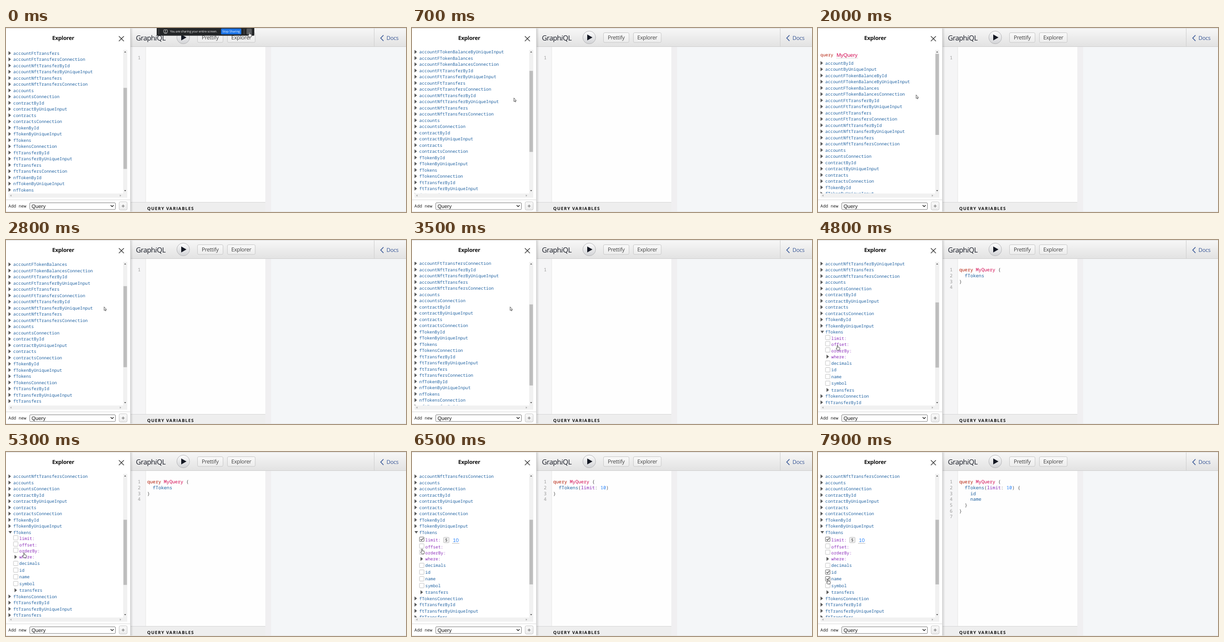
Animation of 799x370 px, one loop 8 s. Source, as an HTML page:

```html
<!DOCTYPE html>
<html lang="en">
<head>
<meta charset="utf-8">
<title>GraphiQL Explorer</title>
<style>
html, body { margin: 0; width: 100%; height: 100%; overflow: hidden; background: #fff; }
svg { display: block; width: 100%; height: 100%; }
text { white-space: pre; text-rendering: geometricPrecision; }
.ui { font-family: "Open Sans", "Noto Sans", sans-serif; }
.form { font: 10.35px "Liberation Sans", Arial, sans-serif; }
.mono { font-family: "Noto Sans Mono", "DejaVu Sans Mono", monospace; font-size: 8.55px; }
.code { font-size: 9.25px; }
.k { fill: #b11a04; }
.d { fill: #d2054e; }
.f { fill: #1f61a0; }
.a { fill: #8b2bb9; }
.n { fill: #2882f9; }
.p { fill: #555; }
.no { fill: #999; text-anchor: middle; }
.tri { fill: #5a5a5a; }
.box { fill: #fff; stroke: #c4c4c4; }
.tick { fill: none; stroke: #555; stroke-width: 1.4; visibility: hidden; }
.on .box { stroke: #666; }
.on .tick { visibility: visible; }
</style>
</head>
<body>
<svg viewBox="0 0 799 370" preserveAspectRatio="none">
  <defs>
    <linearGradient id="bar" x2="0" y2="1"><stop stop-color="#f7f7f7"/><stop offset="1" stop-color="#e2e2e2"/></linearGradient>
    <linearGradient id="btn" x2="0" y2="1"><stop stop-color="#f9f9f9"/><stop offset="1" stop-color="#ececec"/></linearGradient>
    <linearGradient id="run" x2="0" y2="1"><stop stop-color="#fdfdfd"/><stop offset="1" stop-color="#d2d3d6"/></linearGradient>
    <linearGradient id="shade"><stop stop-color="#000" stop-opacity=".13"/><stop offset="1" stop-color="#000" stop-opacity="0"/></linearGradient>
    <clipPath id="view"><rect x="0" y="44" width="234" height="288.5"/></clipPath>
    <clipPath id="field"><rect x="36" y="40" width="43" height="30"/></clipPath>
  </defs>
  <rect width="799" height="370" fill="#fefefe"/>

  <!-- editor and result panes -->
  <rect x="249" y="38" width="30" height="313" fill="#f5f5f6"/>
  <rect x="278.5" y="38" width="1" height="313" fill="#e6e6e6"/>
  <rect x="518" y="38" width="12" height="332" fill="#f0eff1"/>
  <rect x="529.5" y="38" width="269.5" height="332" fill="#f4f6f8"/>
  <rect x="249" y="350" width="269" height="20" fill="#eee"/>
  <rect x="249" y="350" width="269" height="1" fill="#d8d8d8"/>
  <text class="ui" x="282" y="366" font-size="8.6" font-weight="700" letter-spacing="1.1" fill="#111">QUERY VARIABLES</text>
  <g id="editor" class="mono code"></g>

  <!-- toolbar -->
  <rect x="249" width="550" height="38" fill="url(#bar)"/>
  <rect x="249" y="37" width="550" height="1" fill="#d0d0d0"/>
  <g class="ui" fill="#141823">
    <text x="259.5" y="25" font-size="14" letter-spacing="-.5">Graph<tspan font-family="'Liberation Serif', serif" font-style="italic" font-size="15">i</tspan>QL</text>
    <circle cx="354" cy="19" r="12.8" fill="url(#run)" stroke="#b4b4b6" stroke-width=".9"/>
    <path d="M350 13 360.5 19 350 25Z"/>
    <g fill="url(#btn)" stroke="#c6c6c6" stroke-width=".9">
      <rect x="382.5" y="9.5" width="51" height="19.5" rx="2.5"/>
      <rect x="442.3" y="9.5" width="55.5" height="19.5" rx="2.5"/>
    </g>
    <g font-size="10.9" letter-spacing="-.35" fill="#444">
      <text x="391" y="23">Prettify</text>
      <text x="450" y="23">Explorer</text>
    </g>
    <rect x="735" width="1" height="37" fill="#cfcfcf"/>
    <path d="M754 14.5 748.5 20.3 754 26" fill="none" stroke="#3b5998" stroke-width="1.5"/>
    <text x="760" y="24" font-size="11" letter-spacing="-.3" fill="#3b5998">Docs</text>
  </g>

  <!-- explorer panel -->
  <rect x="249" width="5" height="370" fill="url(#shade)"/>
  <rect width="248.5" height="370" fill="#fff"/>
  <rect x="248" width="1" height="370" fill="#d4d4d4"/>
  <text class="ui" x="92.3" y="24" font-size="11" font-weight="700" letter-spacing="-.25" fill="#111">Explorer</text>
  <path d="M225.5 16.5 235.5 26.5M235.5 16.5 225.5 26.5" stroke="#333" stroke-width="1.2"/>

  <g clip-path="url(#view)"><g id="list" class="mono">
    <text class="k" x="4.8" y="57">query</text>
    <text class="form d" x="37" y="57.5" clip-path="url(#field)">MyQuery</text>
    <path d="M36.5 60.7H80" stroke="#aaa" stroke-width=".8" stroke-dasharray="1 1"/>
    <g id="head"></g>
    <g id="args">
      <g id="limit"></g>
      <g id="rest"></g>
    </g>
    <g id="tail"></g>
  </g></g>

  <rect x="234" y="44" width="8.3" height="289" fill="#f1f1f1"/>
  <rect id="thumb" x="234.6" width="7" fill="#bdbdbd"/>
  <rect x="5" y="332.7" width="237.3" height="8.6" fill="#f1f1f1"/>
  <g fill="#555">
    <path d="M236 49.3h4l-2-2.6zM236 326h4l-2 2.6z"/>
    <path d="M10.8 335v4l-2.6-2zM227.5 335v4l2.6-2z" fill="#a5a5a5"/>
  </g>

  <rect y="345" width="248" height="1" fill="#dadada"/>
  <text class="mono" x="4.8" y="361" fill="#222">Add new</text>
  <rect x="47.5" y="351.5" width="171" height="13.5" rx="1.5" fill="#fff" stroke="#777" stroke-width=".9"/>
  <text class="form" x="51" y="362" fill="#111">Query</text>
  <path d="M209 356.3l3 3 3-3" fill="none" stroke="#222" stroke-width="1.3"/>
  <rect x="226" y="349.5" width="16" height="16.5" rx="2.5" fill="url(#btn)" stroke="#c4c4c4" stroke-width=".9"/>
  <path d="M231 358h6M234 355v6" stroke="#555" stroke-width=".9"/>

  <rect width="799" height="1" fill="#dcdcdc"/>
  <rect y="369" width="799" height="1" fill="#e4e4e4"/>

  <!-- screen sharing notice -->
  <g id="notice" class="ui">
    <rect x="301" y="-2" width="195" height="17.5" rx="1.5" fill="#242628"/>
    <path d="M304.5 3v9M306 3v9" stroke="#6a6a6a" stroke-width=".8" stroke-dasharray="1 1"/>
    <rect x="315" y="3.5" width="7.5" height="6" rx="1" fill="none" stroke="#ddd" stroke-width=".8"/>
    <path d="M318.7 8V5M317.4 6.2l1.3-1.3 1.3 1.3M316 11h5.5" fill="none" stroke="#ddd" stroke-width=".7"/>
    <text x="327.5" y="9.3" font-size="6.2" letter-spacing="-.17" fill="#eee">You are sharing your entire screen.</text>
    <rect x="429.5" y="1.3" width="40.5" height="11.4" rx="1.5" fill="#1a73e8"/>
    <text x="449.7" y="9.3" font-size="6.2" text-anchor="middle" letter-spacing="-.1" fill="#fff">Stop Sharing</text>
    <rect x="475" y="2" width=".8" height="10.5" fill="#666"/>
    <rect x="480.5" y="1.3" width="10.5" height="11.4" rx="1.5" fill="#5c5e61"/>
  </g>

  <g id="cursor" fill="#fff" stroke="#333" stroke-width=".8" stroke-linejoin="round">
    <path id="arrow" d="M0 0V7.2L1.6 5.8 2.7 8.1 3.8 7.6 2.8 5.4H4.8Z"/>
    <path id="hand" d="M-.9.6Q0-.5.8.6V4L4 4.7Q4.9 5 4.7 6.2L4 10H-.8L-3 6.6Q-2.4 5.2-.9 6.6Z"/>
  </g>
</svg>
<script>
const $ = id => document.getElementById(id);
const LOOP = 8000, STEP = 100, TOP = 70.5, ROW = 12.5, OPEN_ROW = 22;
const OPEN_Y = TOP + OPEN_ROW * ROW;

const family = s => [s + 'ById', s + 'ByUniqueInput', s + 's', s + 'sConnection'];
const names = ['account', 'accountFTokenBalance', 'accountFtTransfer', 'accountNftTransfer',
  'contract', 'fToken', 'ftTransfer', 'nfToken', 'nftTransfer'].flatMap(family);
names.splice(2, 2);                                    // accounts are listed after their relations
names.splice(14, 0, 'accounts', 'accountsConnection');

const label = (x, y, s, cls = 'f') => `<text class="${cls}" x="${x}" y="${y + 3}">${s}</text>`;
const closed = (x, y) => `<path class="tri" d="M${x} ${y - 4}l5 4-5 4z"/>`;
const opened = (x, y) => `<path class="tri" d="M${x} ${y - 2.5}h7l-3.5 5z"/>`;
const check = (id, y, s, cls, dy) => `<g id="c-${id}">
  <rect class="box" x="15" y="${y + dy - 4.5}" width="9" height="9" rx=".8"/>
  <path class="tick" d="M17 ${y + dy}l2 2.2 3.7-4.6"/>${label(26.5, y, s, cls)}</g>`;

const row = (s, i) => {
  const y = TOP + i * ROW;
  const mark = i === OPEN_ROW
    ? `<g id="shut">${closed(5, y)}</g><g id="open">${opened(5, y)}</g>` : closed(5, y);
  return mark + label(14.5, y, s);
};
const rows = names.map(row);
$('head').innerHTML = rows.slice(0, OPEN_ROW + 1).join('');
$('tail').innerHTML = rows.slice(OPEN_ROW + 1).join('');

const at = dy => OPEN_Y + dy;
$('limit').innerHTML = check('limit', at(12.5), 'limit:', 'a', -1.5) +
  `<g id="value"><rect x="63" y="${at(7)}" width="11" height="11" rx="1.5" fill="#efefef" stroke="#bbb" stroke-width=".9"/>
  <text class="p" x="66" y="${at(15.6)}">$</text>
  <text class="form n" x="81.7" y="${at(16)}">10</text>
  <path d="M80 ${at(19.3)}h14.5" stroke="#aaa" stroke-width=".8"/></g>`;
$('rest').innerHTML =
  check('offset', at(25), 'offset:', 'a', -1.5) +
  check('orderBy', at(37.5), 'orderBy:', 'a', -1.5) +
  closed(17, at(49.5)) + label(26.5, at(49.5), 'where:', 'a') +
  ['decimals', 'id', 'name', 'symbol'].map((s, i) => check(s, at(62.5 + i * 13.5), s, 'f', 0)).join('') +
  closed(17, at(116.5)) + label(26.5, at(116.5), 'transfers');

// editor contents after each click
const CLICKS = [4300, 6100, 7200, 7800];
const docs = [
  [''],
  ['query MyQuery {', '  fTokens', '}', ''],
  ['query MyQuery {', '  fTokens(limit: 10)', '}', ''],
  ['query MyQuery {', '  fTokens(limit: 10) {', '    id', '  }', '}', ''],
  ['query MyQuery {', '  fTokens(limit: 10) {', '    id', '    name', '  }', '}', '']
];
const kinds = { query: 'k', MyQuery: 'd', limit: 'a', 10: 'n' };
const paint = s => s.replace(/\w+|[^\w\s]+/g,
  w => `<tspan class="${kinds[w] || (/\w/.test(w) ? 'f' : 'p')}">${w}</tspan>`);
const codeLine = (s, i) => {
  const y = 63.2 + i * 11.7, indent = s.length - s.trimStart().length;
  return `<text class="no" x="266" y="${y}">${i + 1}</text>` +
    `<text x="${282 + indent * 5.55}" y="${y}">${paint(s.trimStart())}</text>`;
};

// keyframes: time followed by values
const scrollKeys = [[0, 120], [500, 120], [900, 0], [2300, 0], [2800, 71.5], [3500, 136],
  [3800, 160.5], [4900, 160.5], [5300, 184]];
const cursorKeys = [[0, 486, 8], [100, 486, 8], [400, 215, 150], [900, 196, 134.5], [3700, 196, 134.5],
  [4100, 33, 182], [4500, 33, 182], [4800, 39, 211.5], [5100, 38, 211.5], [5300, 36, 202.5],
  [5900, 20, 176], [6300, 20, 176], [7000, 20, 242], [7300, 20, 242], [7700, 20, 255.5]];

function sample(keys, t) {
  const i = keys.findIndex(k => k[0] > t);
  if (i < 0) return keys[keys.length - 1].slice(1);
  const a = keys[i - 1], b = keys[i], p = (t - a[0]) / (b[0] - a[0]);
  return a.slice(1).map((v, j) => v + (b[j + 1] - v) * p);
}
const show = (id, on) => $(id).setAttribute('visibility', on ? 'inherit' : 'hidden');
const move = (id, x, y) => $(id).setAttribute('transform', `translate(${x} ${y})`);

let shown = -1;
function setState(n) {
  if (n === shown) return;
  shown = n;
  const open = n > 0, limit = n > 1;
  $('editor').innerHTML = docs[n].map(codeLine).join('');
  show('args', open);
  show('open', open);
  show('shut', !open);
  show('value', limit);
  move('limit', 0, limit ? 3 : 0);
  move('rest', 0, limit ? 4 : 0);
  move('tail', 0, open ? (limit ? 120.5 : 116.5) : 0);
  ['limit', 'id', 'name'].forEach((s, i) => $('c-' + s).classList.toggle('on', n > i + 1));
}

function draw(t) {
  const state = CLICKS.filter(c => t >= c).length;
  setState(state);

  const [scroll] = sample(scrollKeys, t);
  move('list', 0, -scroll);
  $('thumb').setAttribute('y', 52 + scroll * (state ? 0.458 : 0.57));
  $('thumb').setAttribute('height', state > 1 ? 130 : state ? 131 : 163);

  const [x, y] = sample(cursorKeys, t);
  const hand = t < 200 || t >= 4000;
  move('cursor', x, y);
  show('hand', hand);
  show('arrow', !hand);

  const p = Math.min(t / 400, 1), size = 1 - p * 0.4;
  $('notice').setAttribute('opacity', (1 - p) ** 2);
  $('notice').setAttribute('transform', `translate(${399 * (1 - size)} ${p * p * 360}) scale(${size})`);
}

const start = performance.now();
function tick() {
  const t = (performance.now() - start) % LOOP;
  draw(Math.floor(t / STEP) * STEP);
  requestAnimationFrame(tick);
}
tick();
</script>
</body>
</html>
```
